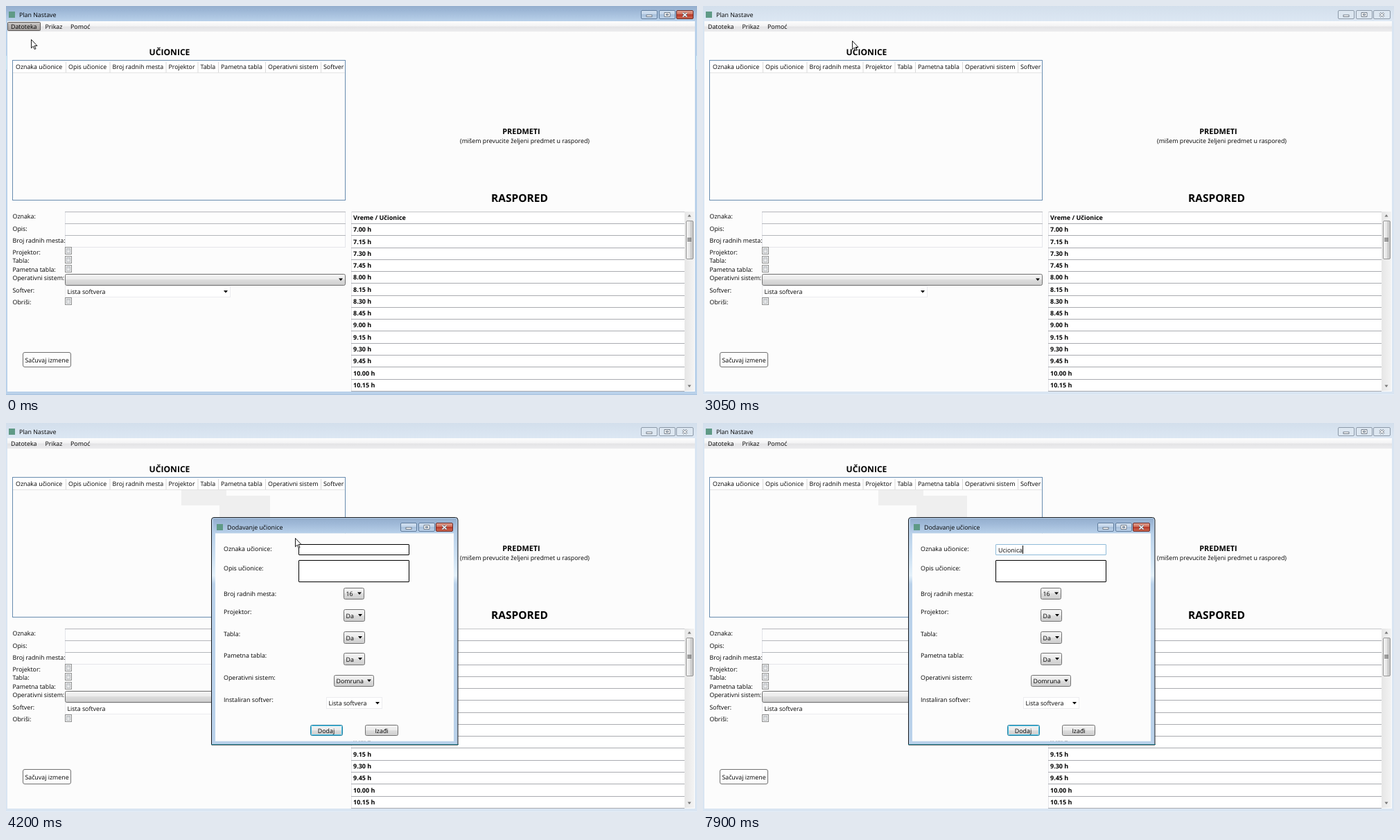
An HTML page that plays this animation: 997x562 px, repeating every 8000 ms.

```html
<!DOCTYPE html>
<html lang="sr">
<head>
<meta charset="utf-8">
<title>Učionice</title>
<style>
html, body { margin: 0; width: 100%; height: 100%; overflow: hidden; background: #fcfcfc; }
svg { display: block; width: 997px; height: 562px; }
text {
  font: 8.85px "Open Sans", "Noto Sans", sans-serif;
  fill: #000; white-space: pre; text-rendering: geometricPrecision;
}
text.b { font-weight: 700; }
</style>
</head>
<body>
<svg id="stage" viewBox="0 0 997 562">
  <defs>
    <clipPath id="tableClip"><rect x="10" y="78" width="478.500" height="202"/></clipPath>
  </defs>
</svg>
<script>
const LOOP = 8000;
const stage = document.getElementById('stage');
const defs = stage.querySelector('defs');

function add(parent, tag, attrs = {}) {
  const el = document.createElementNS('http://www.w3.org/2000/svg', tag);
  for (const k in attrs) el.setAttribute(k, attrs[k]);
  parent.append(el);
  return el;
}
const group = (parent, attrs) => add(parent, 'g', attrs);

function gradient(id, horizontal, ...stops) {
  const g = add(defs, 'linearGradient', { id, x2: horizontal ? 1 : 0, y2: horizontal ? 0 : 1 });
  stops.forEach(([offset, color]) => add(g, 'stop', { offset, 'stop-color': color }));
}

const fill = (p, x, y, width, height, color) => add(p, 'rect', { x, y, width, height, fill: color });

// One-pixel outline whose outer edges are the pixels x1..x2, y1..y2
const box = (p, x1, y1, x2, y2, color, stroke, rx = 0) => add(p, 'rect', {
  x: x1 + .5, y: y1 + .5, width: x2 - x1, height: y2 - y1, fill: color, stroke, rx
});

function label(p, x, y, str, { size, bold, mid } = {}) {
  const el = add(p, 'text', { x, y });
  if (size) el.style.fontSize = size + 'px';
  if (bold) el.setAttribute('class', 'b');
  if (mid) el.setAttribute('text-anchor', 'middle');
  el.textContent = str;
  return el;
}

const arrow = (p, x, y, dir = 1, color = '#000', w = 3) =>
  add(p, 'path', { d: `M${x - w} ${y - dir * 1.5}h${w * 2}l${-w} ${dir * 3.5}z`, fill: color });

gradient('titleOn', 0, [0, '#94aecd'], [.3, '#9db7d6'], [1, '#b9d1ea']);
gradient('titleOff', 0, [0, '#d3dfec'], [1, '#dce7f3']);
gradient('menu', 0, [0, '#fdfdfd'], [.45, '#f3f3f4'], [.55, '#e4e4e6'], [1, '#ececee']);
gradient('menuHot', 0, [0, '#c9c6c4'], [.5, '#b4b0ae'], [1, '#a5a19f']);
gradient('btn', 0, [0, '#f3f3f3'], [.5, '#ebebeb'], [.5, '#dddddd'], [1, '#cdcdcd']);
gradient('winBtn', 0, [0, '#d3e1f1'], [.5, '#c0d3e8'], [.5, '#a9c1dc'], [1, '#bdd2e9']);
gradient('closeBtn', 0, [0, '#e3a698'], [.48, '#cf6a55'], [.5, '#b8392a'], [1, '#cd6a52']);
gradient('track', 1, [0, '#e6e6e6'], [1, '#f3f3f3']);
gradient('thumb', 1, [0, '#f5f5f5'], [.5, '#e6e6e6'], [.5, '#d4d4d4'], [1, '#c6c6c6']);
gradient('side', 0, [0, '#b9d1ea'], [.12, '#cfe2f3'], [.2, '#e4f1fa'], [.24, '#b9d1ea'], [1, '#b9d1ea']);
gradient('check', 0, [0, '#cdd0d3'], [1, '#f4f4f4']);

function winButtons(p, x, y, active) {
  const line = active ? '#5f7c9d' : '#8c99a8';
  const face = active ? 'url(#winBtn)' : '#dde7f1';
  const glyph = { fill: '#fff', stroke: '#55616f', 'stroke-width': .8 };
  box(p, x, y, x + 23, y + 12, face, line, 1.5);
  box(p, x + 26, y, x + 49, y + 12, face, line, 1.5);
  box(p, x + 51, y, x + 75, y + 12, active ? 'url(#closeBtn)' : face, active ? '#6d2b27' : line, 1.5);
  add(p, 'rect', { x: x + 8, y: y + 7, width: 8, height: 2.4, ...glyph });
  add(p, 'path', { d: `M${x + 34} ${y + 3.500}h8v6h-8zM${x + 36.5} ${y + 5.5}v2h3v-2z`, 'fill-rule': 'evenodd', ...glyph });
  const d = `M${x + 60.5} ${y + 4}l6 5.500M${x + 66.5} ${y + 4}l-6 5.500`;
  add(p, 'path', { d, stroke: '#55616f', 'stroke-width': 2.800, fill: 'none' });
  add(p, 'path', { d, stroke: '#fff', 'stroke-width': 1.500, fill: 'none' });
}

const icon = (p, x, y) => fill(p, x, y, 9, 9, '#5f9a86');

function combo(p, x1, y1, x2, y2, str) {
  box(p, x1, y1, x2, y2, 'url(#btn)', '#707070', 2);
  label(p, x1 + 3.5, y2 - 4.500, str);
  arrow(p, x2 - 6, (y1 + y2) / 2);
}

function listCombo(p, x1, y1, x2, y2) {
  box(p, x1, y1, x2, y2, '#fff', '#ececef');
  label(p, x1 + 3.5, y2 - 4, 'Lista softvera');
  arrow(p, x2 - 6, (y1 + y2) / 2 + .5);
}

// ---- Main window ----
function frame(active) {
  const g = group(stage);
  const c = active ? '#b9d1ea' : '#d9e5f2';
  fill(g, 0, 0, 997, 562, c);
  fill(g, 0, 0, 997, 22, `url(#title${active ? 'On' : 'Off'})`);
  if (active) [0, 996].forEach(x => fill(g, x, 72, 1, 20, '#d5f1fa'));
  fill(g, 0, 561, 997, 1, active ? '#a9c3de' : '#e6eef6');
  winButtons(g, 916, 6, active);
  return g;
}
const frameOn = frame(true);
const frameOff = frame(false);

const main = group(stage);
fill(main, 2, 22, 992, 535, '#fcfcfc');
fill(main, 2, 22, 992, 15, 'url(#menu)');
icon(main, 4, 8);
label(main, 19, 15.500, 'Plan Nastave');
const hot = box(main, 2, 23, 49, 35, 'url(#menuHot)', '#5c5856', 1);
[[7, 'Datoteka'], [56.5, 'Prikaz'], [93, 'Pomoć']].forEach(([x, s]) => label(main, x, 33, s));

label(main, 236, 71, 'UČIONICE', { size: 12.1, bold: 1, mid: 1 });
label(main, 743.5, 185, 'PREDMETI', { size: 10.9, bold: 1, mid: 1 });
label(main, 748.500, 198, '(mišem prevucite željeni predmet u raspored)', { mid: 1 });
label(main, 741, 282.5, 'RASPORED', { size: 15.5, bold: 1, mid: 1 });

// Classroom table
box(main, 9, 78, 489, 280, '#fff0', '#688caf');
const table = group(main, { 'clip-path': 'url(#tableClip)' });
fill(table, 10, 79, 479, 17, '#fff');
fill(table, 10, 96, 479, 1, '#e3e3e3');
[[14, 'Oznaka učionice'], [90, 'Opis učionice'], [153.500, 'Broj radnih mesta'], [234.500, 'Projektor'],
 [280.5, 'Tabla'], [310, 'Pametna tabla'], [378, 'Operativni sistem'], [458, 'Softver']
].forEach(([x, s], i) => {
  label(table, x, 91, s);
  if (i) fill(table, x - 4, 81, 1, 15, '#dadada');
});
const smudges = [[253, 97, 65, 22], [308, 105, 73, 31]].map(r => fill(main, ...r, '#efefef'));

// Edit form
[[307, 'Oznaka:'], [324.500, 'Opis:'], [341.500, 'Broj radnih mesta:'], [358.500, 'Projektor:'], [371, 'Tabla:'],
 [383.5, 'Pametna tabla:'], [396, 'Operativni sistem:'], [413.500, 'Softver:'], [431, 'Obriši:']
].forEach(([y, s]) => label(main, 9.5, y, s));
[297, 314, 331].forEach(y => {
  box(main, 85, y, 489, y + 17, '#fdfdfd', '#e4e5ea');
  fill(main, 85, y, 405, 1, '#b4b6bb');
});
[348, 361, 374, 421].forEach(y => {
  box(main, 85, y, 94, y + 10, '#f4f4f4', '#8e8f8f');
  box(main, 87, y + 2, 92, y + 8, 'url(#check)', '#b9bdc1');
});
combo(main, 85, 387, 489, 403, '');
listCombo(main, 85, 404, 323, 420);
box(main, 24, 500, 93, 521, '#fdfdfd', '#707070', 2.5);
label(main, 59, 514.5, 'Sačuvaj izmene', { mid: 1 });

// Timetable
const PITCH = 17.27;
fill(main, 498, 297, 481, 259, '#fff');
fill(main, 498, 297, 481, 1, '#c4c5c8');
fill(main, 498, 297, 1, 259, '#e6e6ea');
label(main, 501, 309, 'Vreme / Učionice', { bold: 1, size: 9 });
for (let i = 0; i < 15; i++) {
  const y = Math.round(314 + i * PITCH);
  fill(main, 498, y, 481, 1, '#a9abb0');
  if (i === 14) break;
  const min = String(i % 4 * 15).padStart(2, '0');
  label(main, 501, 326.3 + i * PITCH, `${7 + (i >> 2)}.${min} h`, { bold: 1, size: 9 });
}
fill(main, 979, 297, 14, 259, 'url(#track)');
arrow(main, 986, 303, -1, '#777', 2.5);
arrow(main, 986, 549, 1, '#777', 2.500);
box(main, 981, 310, 991, 365, 'url(#thumb)', '#979797', 1.5);
[335, 337, 339].forEach(y => fill(main, 983, y, 6, 1, '#555'));

// ---- Dialog ----
const dialog = group(stage);
const outer = 'M296.5 465V140q0 -3.500 3.500 -3.500H648.500q3.500 0 3.500 3.500V465z';
const inner = 'M302 159.500H646V459.500H302z';
add(dialog, 'path', { d: outer + inner, 'fill-rule': 'evenodd', fill: '#b9d1ea' });
fill(dialog, 299, 138, 351, 21.5, 'url(#titleOn)');
[297, 646].forEach(x => fill(dialog, x, 159.500, 5, 305, 'url(#side)'));
add(dialog, 'path', { d: outer, fill: 'none', stroke: '#16191d' });
fill(dialog, 296, 464, 357, 1, '#17707f');
icon(dialog, 304, 146);
label(dialog, 319, 153.500, 'Dodavanje učionice');
winButtons(dialog, 569, 144, true);

const body = group(dialog);
fill(body, 302, 159.500, 344, 300, '#fcfcfc');
[[185, 'Oznaka učionice:'], [213, 'Opis učionice:'], [250, 'Broj radnih mesta:'], [276, 'Projektor:'],
 [307.5, 'Tabla:'], [339, 'Pametna tabla:'], [370.500, 'Operativni sistem:'], [402.500, 'Instaliran softver:']
].forEach(([y, s]) => label(body, 314, y, s));
const field = box(body, 422, 175, 581, 190, '#fff', '#000', .5);
box(body, 422, 198, 581, 229, '#fff', '#000', .5);
combo(body, 487, 238, 516, 254, '16');
[269, 301, 332].forEach(y => combo(body, 487, y, 517, y + 17, 'Da'));
combo(body, 473, 364, 530, 380, 'Domruna');
listCombo(body, 462, 396, 542, 412);
box(body, 439, 436, 485, 451, 'url(#btn)', '#2f7f9e', 2);
box(body, 440, 437, 484, 450, 'none', '#43c3e8', 1);
box(body, 518, 436, 565, 451, 'url(#btn)', '#707070', 2);
label(body, 462, 447.500, 'Dodaj', { mid: 1 });
label(body, 542, 447.5, 'Izađi', { mid: 1 });
const typed = label(body, 426, 187, '');
const caret = fill(body, 426, 177, 1, 12, '#000');

// ---- Pointers ----
const pointer = add(stage, 'path', {
  d: 'M.5 .5V12.800L3.300 10.200L5.200 14.500L7 13.700L5.100 9.500H9z',
  fill: '#fff', stroke: '#000', 'stroke-width': .9
});
const beam = add(stage, 'path', {
  d: 'M-2.500 -5.500h2l.5 .5l.5 -.5h2M-2.500 5.500h2l.5 -.5l.5 .5h2M0 -5V5',
  fill: 'none', stroke: '#000'
});

// ---- Timeline ----
const sweepX = [37, 38, 40, 43, 46, 50, 55, 62, 72, 85, 102, 121, 142, 163, 183, 201];
const sweep = sweepX.map((x, i) => [
  i < 6 ? 890 + i * 58 : 1230 + (i - 6) * 51.1,
  x,
  Math.round(47.5 - 1.5 * Math.sin(i / 11 * Math.PI))
]);
const moves = [
  [0, 36, 48], ...sweep,
  [1760, 206, 49], [1820, 211, 50], [1870, 215, 50],
  [3970, 253, 97], [4020, 308, 104], [4070, 371, 121], [4130, 399, 147], [4200, 417, 166],
  [4230, 430, 179], [4280, 436, 182], [4320, 439, 182]
];
const typing = [
  [0, ''], [5800, 'U'], [6040, 'Ui'], [6260, 'Uin'], [6390, 'Uini'],
  [6720, 'Uin'], [6810, 'Ui'], [6900, 'U'],
  [7140, 'Uc'], [7230, 'Uci'], [7320, 'Ucio'], [7570, 'Ucion'], [7630, 'Ucioni'],
  [7810, 'Ucionic'], [7900, 'Ucionica']
];
const at = (steps, t) => steps.findLast(s => s[0] <= t);
const show = (el, on) => { el.style.display = on ? '' : 'none'; };

function draw(t) {
  const active = t < 3050;
  show(frameOn, active);
  show(frameOff, !active);
  show(hot, active);
  show(dialog, t >= 3170);
  show(body, t >= 3220);
  show(smudges[0], t >= 4020);
  show(smudges[1], t >= 4070);

  const [, x, y] = at(moves, t);
  pointer.setAttribute('transform', `translate(${x} ${y})`);
  beam.setAttribute('transform', `translate(${x + .5} ${y + .5})`);
  show(pointer, t < 4230 && !(t >= 710 && t < 890));
  show(beam, t >= 4230 && t < 5730);

  field.setAttribute('stroke', t < 4230 ? '#000' : t < 4600 ? '#a9cbe2' : '#8fbbd9');
  const str = at(typing, t)[1];
  if (typed.textContent !== str) typed.textContent = str;
  show(caret, t >= 4600 && !(t >= 5150 && t < 5650));
  if (t >= 4600) caret.setAttribute('x', Math.round(426 + (str ? typed.getComputedTextLength() : 0)));
}

const start = performance.now();
function tick() {
  draw((performance.now() - start) % LOOP);
  requestAnimationFrame(tick);
}
tick();
</script>
</body>
</html>
```
